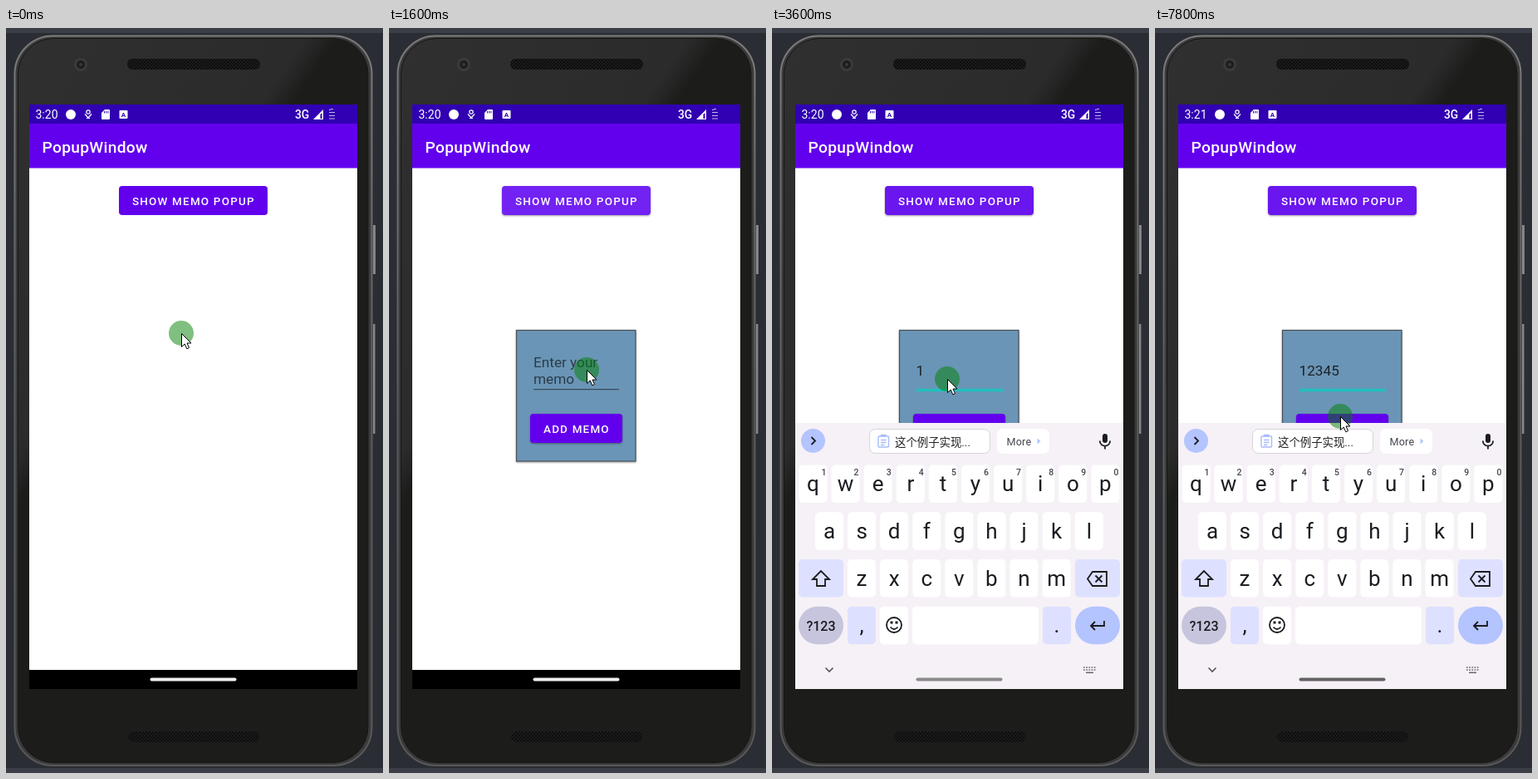
An HTML page that plays this animation: 454x896 px, repeating every 8 s.

```html
<!DOCTYPE html>
<html lang="en">
<head>
<meta charset="utf-8">
<title>Memo popup</title>
<style>
  html, body { margin: 0; width: 100%; height: 100%; overflow: hidden; background: #2b2d34; }
  svg { display: block; width: 100vw; height: 100vh; font-family: Roboto, sans-serif; }
  .button { font-weight: 500; font-size: 13.44px; letter-spacing: 1.2px; fill: #fff; }
  .field { font-size: 17.2px; }
  .letter { font-size: 26px; text-anchor: middle; fill: #1b1b21; }
  .digit { font-size: 10.5px; font-weight: 500; text-anchor: middle; fill: #45454f; }
  .line { fill: none; stroke: #1b1b21; stroke-width: 1.8; }
</style>
</head>
<body>
<svg viewBox="0 0 454 896" preserveAspectRatio="none">
  <defs>
    <linearGradient id="gloss" gradientUnits="userSpaceOnUse" x1="14" y1="10" x2="276" y2="191">
      <stop offset="0" stop-color="#303030"/>
      <stop offset=".9" stop-color="#2b2b2b"/>
      <stop offset="1" stop-color="#1c1d1b"/>
    </linearGradient>
    <linearGradient id="rim" x2="0" y2="1">
      <stop offset="0" stop-color="#7c7c7c"/>
      <stop offset=".5" stop-color="#5c5c5c"/>
      <stop offset="1" stop-color="#585858"/>
    </linearGradient>
    <pattern id="mesh" width="4" height="4" patternUnits="userSpaceOnUse">
      <rect width="4" height="4" fill="#0e0e0e"/>
      <circle cx="1" cy="1" r=".8" fill="#2a2a2a"/>
      <circle cx="3" cy="3" r=".8" fill="#2a2a2a"/>
    </pattern>
    <filter id="shadow" x="-20%" y="-20%" width="140%" height="150%">
      <feDropShadow dx="0" dy="1" stdDeviation="1.2" flood-opacity=".4"/>
    </filter>
    <clipPath id="screen"><rect x="28" y="92" width="395" height="703"/></clipPath>
  </defs>

  <!-- Phone -->
  <rect width="454" height="896" fill="#2b2d34"/>
  <path d="M0 0H454V6H0zM0 890H454V896H0z" fill="#3b3e46"/>
  <path d="M442 237h3v59h-3zM442 356h2.5v132h-2.5z" fill="#85858a"/>
  <rect x="10.5" y="9.5" width="430" height="877.5" rx="46" fill="#3a3a3a" stroke="url(#rim)" stroke-width="2"/>
  <rect x="14.5" y="12.5" width="421.500" height="871" rx="43" fill="url(#gloss)" stroke="#161616"/>
  <circle cx="90" cy="44" r="8" fill="#3b3b3b"/>
  <circle cx="90" cy="44" r="5" fill="#1d1d1d"/>
  <circle cx="90" cy="44" r="2" fill="#383838"/>
  <rect x="146" y="37" width="160" height="13" rx="6" fill="url(#mesh)"/>
  <rect x="147" y="846" width="158" height="13" rx="6" fill="url(#mesh)"/>

  <g clip-path="url(#screen)">
    <path d="M28 168H423V772H28z" fill="#fff"/>
    <path d="M28 772H423V795H28z" fill="#000"/>
    <path d="M28 115H423V168.5H28z" fill="#6200ee"/>
    <path d="M28 92H423V115H28z" fill="#3000b2"/>

    <!-- Status bar -->
    <g fill="#fff">
      <text id="clock" x="35.5" y="109" font-size="14"></text>
      <circle cx="78" cy="104" r="6"/>
      <g fill="none" stroke="#fff" stroke-width="1.2">
        <circle cx="99" cy="101" r="2.2"/>
        <path d="M95 103.5l4 4.5l4-4.5M97 108.5h4"/>
      </g>
      <path d="M119 98h5q1 0 1 1v10q0 1-1 1h-8q-1 0-1-1v-7z"/>
      <path d="M118.5 100v2.5M120.7 100v2.5M122.9 100v2.5" stroke="#3000b2"/>
      <rect x="136.5" y="99" width="10" height="10" rx="1"/>
      <text x="141.5" y="107" font-size="8" font-weight="700" text-anchor="middle" fill="#3000b2">A</text>
      <text x="348" y="108.5" font-size="13.8" font-weight="500">3G</text>
      <path d="M370 110L382 98V110z"/>
      <path d="M378.5 104V109H380.5V102z" fill="#3000b2"/>
      <path d="M389 98.5h2M391 97.5h3M389 101.5h7M389 105.5h7M389 109h7" stroke="#fff" stroke-width=".9" opacity=".8"/>
    </g>
    <text x="43.5" y="149.5" font-size="19.2" font-weight="500" letter-spacing=".3" fill="#fff">PopupWindow</text>

    <rect id="show" x="136" y="190" width="179" height="35" rx="4"/>
    <text class="button" x="152" y="212.5">SHOW MEMO POPUP</text>

    <!-- Popup -->
    <g id="popup">
      <rect x="153.5" y="363.5" width="143.5" height="157.5" fill="#6a95b6" stroke="#4c5055" stroke-width="1.2" filter="url(#shadow)"/>
      <g id="hint" class="field" fill="#000" fill-opacity=".6">
        <text x="174" y="408">Enter your</text>
        <text x="174" y="428">memo</text>
      </g>
      <text id="memo" class="field" x="173.5" y="417.5" fill="#1c2228"></text>
      <rect id="caret" y="399" width="2" height="23" fill="#20c0be"/>
      <rect id="underline" x="174"/>
      <rect x="170" y="464" width="111" height="35" rx="4" fill="#6200ee" filter="url(#shadow)"/>
      <text class="button" x="186" y="487">ADD MEMO</text>
    </g>

    <!-- Keyboard -->
    <g id="keyboard">
      <rect x="28" y="475" width="395" height="380" fill="#f6f1f6"/>
      <circle cx="49.5" cy="496.5" r="14.5" fill="#b4c4ff"/>
      <path class="line" d="M47.5 492l4.5 4.5l-4.5 4.5"/>
      <rect x="117.5" y="482.5" width="145" height="29" rx="7" fill="#fff" stroke="#d5d3dc"/>
      <g fill="none" stroke="#a9bcfb" stroke-width="1.4">
        <rect x="128" y="491" width="12.5" height="13" rx="1"/>
        <path d="M131 495.5h6.5M131 498.5h6.5M131 501.5h4.5"/>
        <path d="M131.5 491.5v-2h5.500v2" fill="#a9bcfb"/>
      </g>
      <text x="148" y="502.5" font-size="13.4" fill="#222" font-family="Roboto, 'Noto Sans CJK SC', 'Noto Sans CJK', sans-serif" lang="zh-CN">这个例子实现...</text>
      <rect x="271" y="482" width="63" height="30" rx="7" fill="#fff"/>
      <text x="282.5" y="502" font-size="12.6" letter-spacing=".2" fill="#44444c">More</text>
      <path d="M319.5 493.5l4 3.5l-4 3.5z" fill="#b4c4ff"/>
      <rect x="398" y="488" width="6" height="11" rx="3" fill="#1b1b21"/>
      <path class="line" d="M394.8 496.5a6.2 6.2 0 0 0 12.4 0M401 502.5v4"/>

      <g id="keys"></g>

      <path class="line" d="M59 653l-10 10h5v8h10v-8h5z"/>
      <path class="line" d="M386 654h17v17h-17l-6-8.5zM389.5 658.5l8 8m0-8l-8 8"/>
      <text x="59" y="724.5" font-size="16" font-weight="500" text-anchor="middle" fill="#1b1b21">?123</text>
      <circle class="line" cx="147" cy="718" r="9"/>
      <path class="line" d="M142.5 720.5q4.5 5 9 0"/>
      <path d="M142.5 713.5h3v3h-3zM148.5 713.5h3v3h-3z" fill="#1b1b21"/>
      <path class="line" d="M400 713v6h-16m5-5l-5 5l5 5"/>
      <path d="M64.5 769.5l4.5 4.5l4.5-4.5" fill="none" stroke="#55545c" stroke-width="1.6"/>
      <path d="M375 769h15M375 772h15" stroke="#66656d" stroke-width="1.6" stroke-dasharray="1.7 1.5"/>
      <path d="M378 775.3h9" stroke="#66656d" stroke-width="1.5"/>
    </g>
    <rect id="pill" x="173.5" y="781.5" width="104" height="4" rx="2"/>
  </g>

  <g id="pointer">
    <circle r="15" fill="#008000" fill-opacity=".5"/>
    <circle id="ring" r="15" fill="none" stroke="#f00" stroke-width="3"/>
    <path d="M.5 .5V16.5L4.2 13L6.8 18.8L9.5 17.6L7 12H12z" fill="#fff" stroke="#000"/>
  </g>
</svg>

<script>
const LOOP = 8000, STEP = 200;
const el = id => document.getElementById(id);
const show = (id, on) => el(id).style.display = on ? '' : 'none';
const set = (id, attrs) => {
  for (const name in attrs) el(id).setAttribute(name, attrs[name]);
};

const PITCH = 39.1;
function key(x, y, width, fill = '#fff', label = '', radius = 5) {
  const text = label && `<text class="letter" x="${x + width / 2}" y="${y + 31.5}">${label}</text>`;
  return `<rect x="${x}" y="${y}" width="${width}" height="45.5" rx="${radius}" fill="${fill}"/>${text}`;
}
const row = (letters, x, y) =>
  [...letters].map((c, i) => key(x + i * PITCH, y, 34, '#fff', c)).join('');
const digits = [...'1234567890'].map((d, i) =>
  `<text class="digit" x="${62.5 + i * PITCH}" y="538">${d}</text>`).join('');

el('keys').innerHTML = row('qwertyuiop', 32.5, 525.5) + digits +
  row('asdfghjkl', 52, 582.3) + row('zxcvbnm', 91, 639) +
  key(32, 639, 54, '#dde1ff') + key(365, 639, 54, '#dde1ff') +
  key(32, 695.8, 54, '#c6c5dd', '', 22.7) + key(91, 695.8, 34, '#dde1ff', ',') +
  key(130, 695.8, 34) + key(169, 695.8, 152) +
  key(326, 695.8, 34, '#dde1ff', '.') + key(365, 695.8, 54, '#b4c4ff', '', 22.7);

// Tables of [start time, value...]
const path = [
  [0, 211, 367], [200, 211, 355], [400, 212, 300], [600, 214, 235], [800, 215.5, 208],
  [1200, 215.5, 208], [1400, 232, 335], [1600, 238, 411], [1800, 222, 421], [2000, 211, 422],
  [6800, 211, 422], [7000, 228, 432], [7200, 240, 448], [7400, 234, 460], [7600, 224, 466],
  [7800, 223, 467]
];
const typed = [[0, ''], [3200, '1'], [3800, '12'], [4800, '123'], [5400, '1234'], [6200, '12345']];
const caret = [[0, false], [3200, true], [3600, false], [3800, true], [4200, false],
  [4800, true], [5800, false], [6200, true], [6800, false]];
const buttonFill = [[0, '#6200ee'], [1200, '#7627f1'], [1600, '#7220f2'], [1800, '#6a10f0'],
  [2000, '#6200ee'], [3200, '#6a14ee']];
const pillGray = [[0, 240], [2600, 228], [2800, 210], [3000, 192], [3200, 174],
  [3400, 156], [3600, 138], [3800, 119], [4200, 99]];

const at = (table, t) => table.findLast(entry => entry[0] <= t)[1];

function along(table, t) {
  const i = table.findLastIndex(p => p[0] <= t);
  const a = table[i], b = table[i + 1] || a;
  const k = (t - a[0]) / (b[0] - a[0] || 1);
  return [1, 2].map(n => a[n] + (b[n] - a[n]) * k);
}

function draw(t) {
  const text = at(typed, t), fill = at(buttonFill, t), gray = at(pillGray, t);
  const focused = t >= 2200;

  el('clock').textContent = t < 7000 ? '3:20' : '3:21';
  set('show', { fill, filter: fill === '#6200ee' ? 'none' : 'url(#shadow)' });

  show('popup', t >= 1200);
  show('hint', !text);
  el('memo').textContent = text;
  show('caret', at(caret, t));
  set('caret', { x: 173.5 + text.length * 9.66 });
  set('underline', focused
    ? { y: 433.8, width: 104, height: 3.4, fill: '#20c0be' }
    : { y: 434, width: 103, height: 1.2, fill: '#354a5b' });

  show('keyboard', t >= 2400);
  set('keyboard', { transform: `translate(0 ${t < 2600 ? 45 : 0})` });
  set('pill', { fill: `rgb(${gray},${gray},${gray})` });

  set('pointer', { transform: `translate(${along(path, t)})` });
  show('ring', t === 1000 || t === 2000);
}

const start = performance.now();
function tick() {
  const t = (performance.now() - start) % LOOP;
  draw(Math.floor(t / STEP) * STEP);
  requestAnimationFrame(tick);
}
tick();
</script>
</body>
</html>
```
